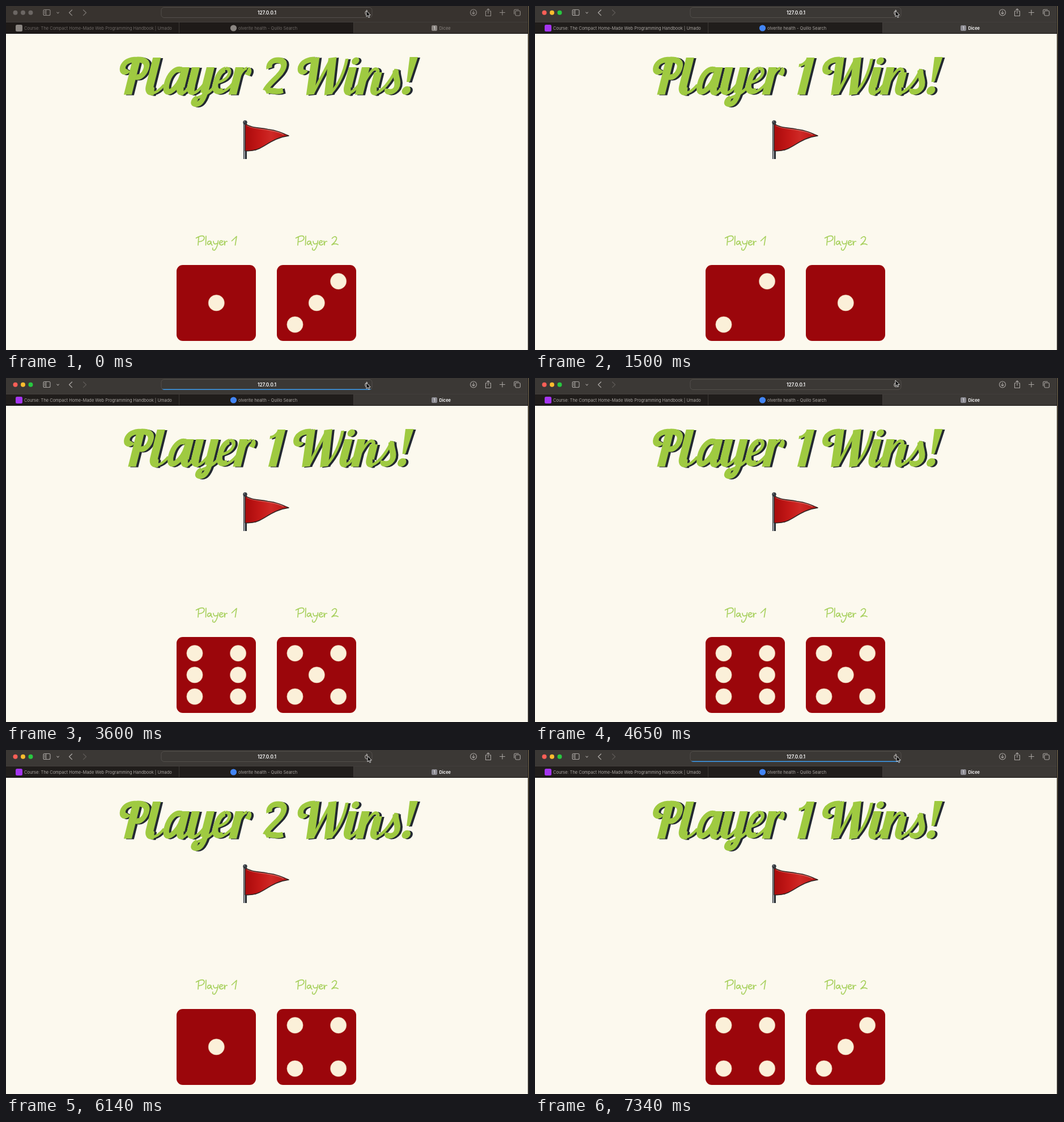
Animation, 923 px wide and 607 px high, one loop 8 s. Source, as an HTML page:

```html
<!DOCTYPE html>
<html lang="en">
<head>
<meta charset="utf-8">
<title>Dicee</title>
<style>
  html, body { margin: 0; width: 100%; height: 100%; overflow: hidden; background: #fcf9ee; }
  svg { display: block; width: 100%; height: 100%; }
  #stage {
    --bar: #3b3835; --tab: #201d1b; --icon: #aaa6a3; --text: #aaa6a2; --bright: #fff; --faint: #5d5956;
    font-family: Inter, "Liberation Sans", sans-serif;
  }
  #stage.away {
    --bar: #38332f; --tab: #1e1a18; --icon: #918c88; --text: #6e6966; --faint: #77726e;
  }
  .bar { fill: var(--bar); }
  .tab { fill: var(--tab); }
  .icons { fill: none; stroke: var(--icon); stroke-width: 1.1; stroke-linecap: round; stroke-linejoin: round; }
  .label { font-size: 7.45px; fill: var(--text); }
  .address { font-size: 8.3px; font-weight: 600; fill: var(--bright); }
  .active { font-weight: 600; fill: var(--bright); }
  .away .active { font-weight: 400; fill: #8a8581; }
  .away .light { fill: #6b6663; }
  .away .mark { fill: #8a8581; }
  .heavy { stroke-width: 14; }
  .medium { stroke-width: 10; }
  .thin { stroke-width: 5.5; }
  .script { fill: none; stroke-linejoin: round; }
  .script .medium, .script .thin { stroke-linecap: round; }
  .face { color: #9fca41; stroke: #9fca41; }
  .shade { color: #232931; stroke: #232931; }
  .solid { fill: currentColor; stroke: none; }
  .hand { fill: none; stroke: #a9d160; stroke-width: 1.7; stroke-linecap: round; stroke-linejoin: round; }
</style>
</head>
<body>
<svg id="stage" viewBox="0 0 923 607" preserveAspectRatio="none">
  <defs>
    <linearGradient id="cloth">
      <stop offset="0" stop-color="#a90a0b"/>
      <stop offset=".35" stop-color="#c41918"/>
      <stop offset=".6" stop-color="#cf2926"/>
      <stop offset="1" stop-color="#b51413"/>
    </linearGradient>
    <linearGradient id="edge" x2="0" y2="1">
      <stop offset="0" stop-color="#8a7a5a"/>
      <stop offset=".12" stop-color="#6b6048"/>
      <stop offset=".5" stop-color="#3a3633"/>
    </linearGradient>
    <clipPath id="field"><rect x="274" y="2.5" width="372" height="18.5" rx="5"/></clipPath>

    <!-- Upright lettering, slanted where it is used -->
    <g id="player">
      <path class="heavy" d="M215 93V156.500M250 91V140Q250 152 260 150.500"/>
      <path class="medium" d="M205 113C202 119 194 116 194 107C195 97 204 94.500 215 94.500C231 94 237 101 236 111C235 122 228 127 221 125"/>
      <path class="thin" d="M257 154Q267 153 275 139"/>
      <path class="medium" d="M299 113C286 108 279 122 279 137C279 152 286 154 291 149C297 144 302 134 303 122"/>
      <path class="heavy" d="M305 108V140Q305 152 312 150.500M323 108V138Q323 151 331 150"/>
      <path class="thin" d="M311 154Q318 150 321 139M329 154Q338 152 346 136"/>
      <path class="heavy" d="M349 108V153"/>
      <path class="medium" d="M351 148Q351 173 341 173C333 173 333 166 339 162"/>
      <path class="thin" d="M339 162Q354 157 363 145"/>
      <path class="medium" d="M376 112C367 114 365 127 365 138C366 150 373 153 381 149"/>
      <path class="thin" d="M368 135Q385 130 385 118Q384 110 376 110M378 152Q388 150 396 136"/>
      <path class="heavy" d="M400 108V156.500"/>
      <path class="thin" d="M402 132Q406 110 414 110"/>
      <path class="medium" d="M415 113Q420 114 417 122"/>
    </g>
    <g id="one">
      <path class="heavy" d="M470 91V156.500"/>
      <path class="thin" d="M466 94Q462 104 453 105"/>
    </g>
    <g id="two">
      <path class="medium" d="M453 110C449 99 457 95.500 464 95.500C482 96 480 112 472 123C466 132 458 139 456 149M457 151C465 145 474 155 487 149"/>
    </g>
    <g id="wins">
      <path class="medium" d="M518 113C516 119 508 116 508 107C509 98 518 94.500 529 94.500"/>
      <path class="heavy" d="M530 91L537 156.500M560 91L569 156.500"/>
      <path class="thin" d="M541 154L558 93M573 153Q588 130 586 93"/>
      <path class="heavy" d="M600 108V140Q600 152 607 150.500M623 108V156.500M647 117V141Q647 152 653 150.500"/>
      <circle class="solid" cx="602" cy="97" r="6.500"/>
      <path class="thin" d="M605 154Q612 151 619 139M627 133Q634 111 641 111Q647 112 647 120M652 154Q663 149 670 134Q676 121 677 111"/>
      <path class="medium" d="M677 113C679 126 689 134 686 145C682 154 670 153 671 146"/>
      <path class="solid" d="M696 90H710.500L707 134H701.500Z"/>
      <circle class="solid" cx="704.500" cy="149" r="7.500"/>
    </g>
    <g id="win1">
      <use href="#player" x="7.500"/><use href="#one"/><use href="#wins" x="-7.500"/>
    </g>
    <g id="win2">
      <use href="#player"/><use href="#two"/><use href="#wins"/>
    </g>
    <path id="name" d="M339 422L340 408M335.500 409.500Q349 402 350 409Q350 415 340 416M353 406L352.500 422M361 415Q356 414 355.500 419Q358 424 362 416Q361.500 421 364 422M366 415Q366 422 372.500 419M374.500 414Q373 427 368 431Q363.500 431 365 427M376.500 418Q383 418 382 414.500Q377 412.500 376.500 419Q379 424 383.500 420M385 414.500L386 422Q386 414 390.500 415.500"/>
  </defs>

  <rect width="923" height="607" fill="#fcf9ee"/>

  <!-- Browser window -->
  <rect class="bar" width="921" height="48"/>
  <rect class="tab" y="29" width="613" height="19"/>
  <path d="M0 28.500H921M305.500 29V48M613.500 29V48" stroke="#45413e" stroke-width=".8"/>
  <path d="M0 48.500H921" stroke="#100e0d"/>
  <circle class="light" cx="16.500" cy="11.800" r="4" fill="#ff5f57"/>
  <circle class="light" cx="30" cy="11.800" r="4" fill="#febc2e"/>
  <circle class="light" cx="43.500" cy="11.800" r="4" fill="#28c840"/>
  <rect class="bar" x="274" y="2.500" width="372" height="18" rx="5" stroke="#56524f" stroke-width=".9"/>
  <rect id="progress" x="275" y="19.500" width="370" height="1.700" fill="#3c9df2" clip-path="url(#field)"/>
  <g class="icons">
    <rect x="66" y="6.500" width="12" height="10" rx="2"/>
    <path d="M70.500 6.500V16.500M67.800 9H68.800M67.800 11H68.800M67.800 13H68.800M89.800 11L91.600 13L93.400 11"/>
    <path d="M116.500 7L111.500 11.800L116.500 16.600" stroke-width="1.300"/>
    <path d="M136.500 7L141.500 11.800L136.500 16.600" stroke="var(--faint)" stroke-width="1.300"/>
    <circle cx="825" cy="11.500" r="5.500"/>
    <path d="M825 8.500V14M822.800 12L825 14.200L827.200 12"/>
    <path id="share" d="M848.500 9H846.500V17.500H855.500V9H853.500M851 13V4.800M848.800 7L851 4.800L853.200 7"/>
    <path d="M871.500 11.500H880.500M876 7V16"/>
    <rect x="899" y="8.500" width="8.500" height="8.500" rx="1.800"/>
    <path d="M896.800 14V8Q896.800 6.300 898.500 6.300H904.500"/>
    <path id="reload" d="M640.800 12A3.600 3.600 0 1 1 637.500 8.600M636.300 6.800L638 8.600L636.300 10.400"/>
    <path id="stop" d="M634.800 9.500L639.800 14.500M639.800 9.500L634.800 14.500" stroke="var(--faint)"/>
  </g>
  <text class="address" x="460.500" y="15" text-anchor="middle">127.0.0.1</text>
  <rect class="mark" x="17" y="33" width="12" height="12" rx="2.500" fill="#a435f0"/>
  <text class="label" x="32" y="41.700">Course: The Compact Home-Made Web Programming Handbook | Umado</text>
  <circle class="mark" cx="401.500" cy="39" r="5.600" fill="#4285f4"/>
  <text class="label" x="410" y="41.700">olverite health - Quillo Search</text>
  <rect class="mark" x="751" y="34" width="10" height="10" rx="2.200" fill="#8d8c93"/>
  <text x="756" y="41.600" font-size="7" text-anchor="middle" fill="#fff">1</text>
  <text class="label active" x="764.500" y="41.700">Dicee</text>
  <rect x="921" width="1" height="607" fill="#24211f"/>
  <rect x="922" width="1" height="607" fill="url(#edge)"/>

  <!-- Page -->
  <g class="script" id="title" role="img" transform="matrix(1 0 -.25 1 39 0)">
    <use class="shade" x="4.200" y="1"/>
    <use class="face"/>
  </g>
  <g>
    <path d="M422 207V270" stroke="#292d32" stroke-width="6"/>
    <path d="M421 208V270" stroke="#aeb5ba" stroke-width="1.800"/>
    <path d="M422 208C435 216 445 214 462 217.500C478 219.500 488 224 499 229C475 232 462 244 447 251.500C439 255.500 431 256 422 255.500Z" fill="url(#cloth)" stroke="#302322" stroke-width="1.500" stroke-linejoin="round"/>
    <path d="M425 211C438 217.500 450 216.500 463 219Q480 221.500 490 227" fill="none" stroke="#d9746c" stroke-width="1.300" opacity=".75"/>
    <circle cx="422" cy="205.500" r="3.700" fill="#33383e"/>
    <circle cx="421" cy="204.300" r="1" fill="#8b949b"/>
  </g>
  <g class="hand">
    <g role="img" aria-label="Player 1"><use href="#name"/><path d="M398.500 414.500L407 406.500L404.500 422"/></g>
    <g role="img" aria-label="Player 2"><use href="#name" x="176"/><path d="M575.500 410Q580 404.500 583.500 409Q584 414 575 421.500Q580 418 586 421"/></g>
  </g>
  <g id="dice"></g>

  <path id="cursor" d="M0 0V10.200L2.400 8.100L4 11.800L5.700 11L4.200 7.500H7.300Z" fill="#0b0b0b" stroke="#fff" stroke-width=".8" stroke-linejoin="round"/>
</svg>

<script>
const LOOP = 8000;
const $ = id => document.getElementById(id);

// Grid cells (0 to 8) that carry a pip, by die value
const PIPS = ['', '4', '26', '246', '0268', '02468', '023568'];

// Each step changes only the values it names
const STEPS = [
  [0, { away: true, roll: [1, 3], load: 0, busy: false, at: [636, 8.5] }],
  [450, { away: false }],
  [600, { roll: [2, 1], load: .03 }],
  [750, { load: 1 }],
  [1050, { load: 0 }],
  [1800, { load: .03, busy: true }],
  [1950, { roll: [6, 2], busy: false }],
  [2100, { load: .6 }],
  [2250, { load: 1 }],
  [2550, { load: 0 }],
  [3150, { load: .03 }],
  [3300, { roll: [6, 5] }],
  [3450, { load: .6 }],
  [3600, { load: 1 }],
  [4050, { load: 0 }],
  [4350, { at: [637, 4] }],
  [4500, { at: [637, 1] }],
  [4650, { at: [636, 4] }],
  [4800, { at: [636, 7] }],
  [4950, { roll: [1, 4], load: .01 }],
  [5100, { load: .3 }],
  [5250, { load: .7 }],
  [5400, { load: 1 }],
  [5690, { at: [637, 9] }],
  [5840, { at: [638, 10.5] }],
  [6140, { load: 0 }],
  [6890, { load: .03, busy: true }],
  [7040, { roll: [4, 3], busy: false }],
  [7190, { load: .6 }],
  [7340, { load: 1 }]
];

function die(value, x) {
  const pips = [...PIPS[value]].map(cell => {
    const cx = x + 32 + cell % 3 * 38.3;
    const cy = 485.7 + Math.floor(cell / 3) * 38.2;
    return `<circle cx="${cx}" cy="${cy}" r="14.2" fill="#fbf0d9" stroke="#d9a58f" stroke-width=".5"/>`;
  });
  return `<rect x="${x}" y="457" width="140" height="134" rx="11" fill="#9b060b"/>` + pips.join('');
}

function show(state) {
  const { away, roll, load, busy, at } = state;
  const winner = roll[0] > roll[1] ? 1 : 2;
  const loading = load > 0 && load < 1;
  $('stage').classList.toggle('away', away);
  $('title').setAttribute('aria-label', `Player ${winner} Wins!`);
  for (const layer of $('title').children) layer.setAttribute('href', '#win' + winner);
  $('dice').innerHTML = die(roll[0], 301) + die(roll[1], 478);
  $('progress').setAttribute('width', 370 * load);
  $('share').style.opacity = busy ? .4 : 1;
  $('reload').style.display = loading ? 'none' : '';
  $('stop').style.display = loading ? '' : 'none';
  $('cursor').setAttribute('transform', `translate(${at})`);
}

let shown = -1;
function tick() {
  const time = performance.now() % LOOP;
  const count = STEPS.filter(([start]) => start <= time).length;
  if (count !== shown) {
    shown = count;
    show(Object.assign({}, ...STEPS.slice(0, count).map(step => step[1])));
  }
  requestAnimationFrame(tick);
}
tick();
</script>
</body>
</html>
```
